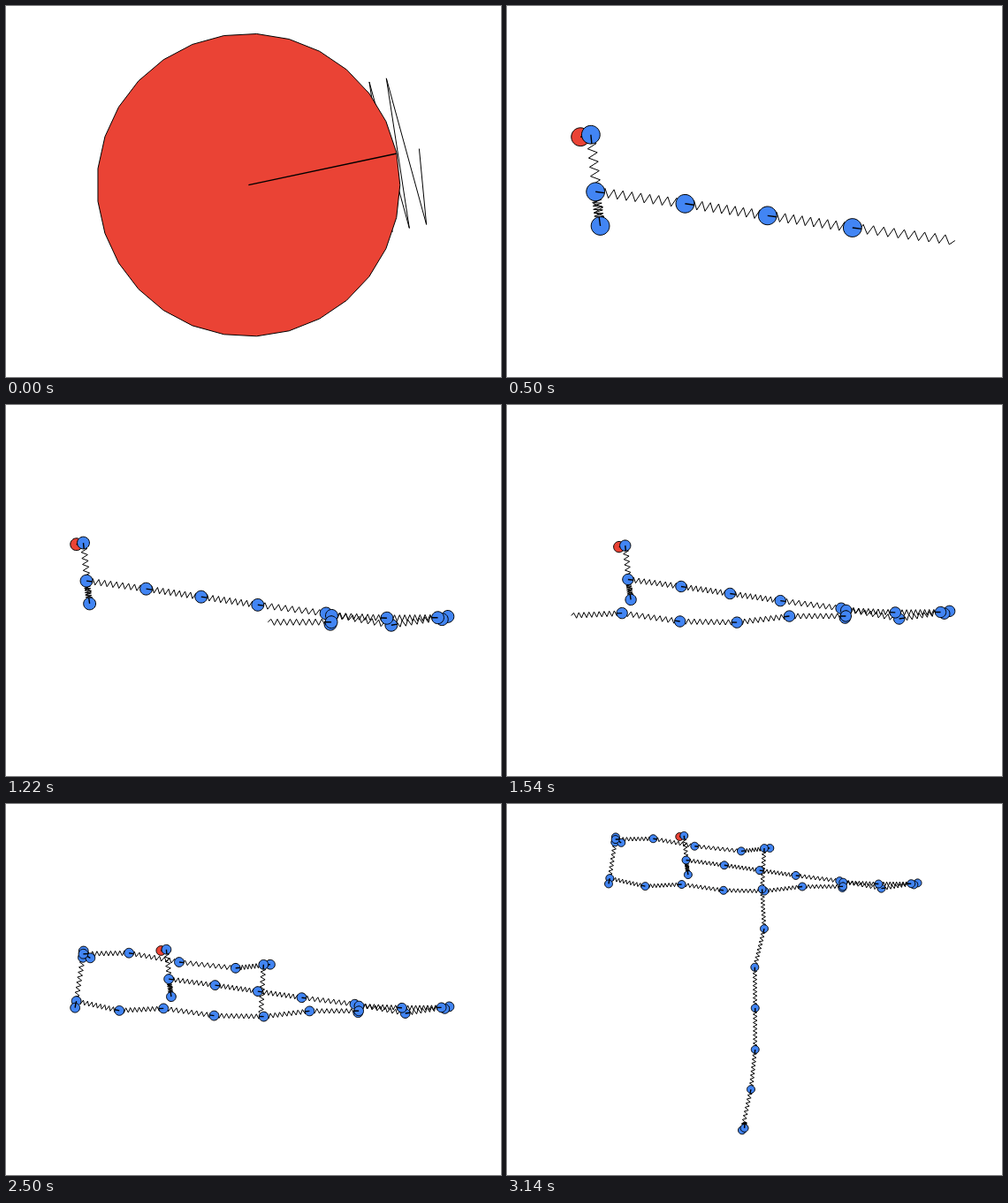
An HTML page with a canvas for the animation above (8000 ms loop, 560x420 px).

```html
<!DOCTYPE html>
<html lang="en">
<head>
<meta charset="utf-8">
<title>Spring chain</title>
<style>
  html, body { margin: 0; width: 100%; height: 100%; overflow: hidden; background: #fff; }
  canvas { display: block; }
</style>
</head>
<body>
<canvas id="stage" width="560" height="420"></canvas>
<script>
const ctx = document.getElementById('stage').getContext('2d');

const LOOP = 8000, FIRST = 100, STEP = 80, LAST = 39;
const RADIUS = 5.38, SIDES = 29, COILS = 20;
const VIEW = { cx: 289.8, cy: 202.65, w: 434, h: 342.3 };

// Joints of the chain in world units, in the order they are added.
const joints = [
  [175.4, 165.89], [181.46, 164.6], [187, 218.04], [184.2, 198.02], [236.6, 205],
  [284.9, 212], [334.6, 219.1], [394.6, 226.6], [451.8, 236.9], [501.5, 229.3],
  [496.4, 231.8], [492.7, 230.3], [448, 230.7], [399.5, 228.5], [398.4, 236.1],
  [399.2, 234.2], [343.5, 234.3], [291.7, 240.5], [235.5, 239.5], [178.3, 231.3],
  [128.3, 233.8], [79.7, 223], [78.2, 230.6], [87, 173.7], [87.8, 166.4],
  [95.4, 174.2], [87.5, 169.6], [139.2, 168.6], [196, 178.9], [259.8, 185.7],
  [299, 181.6], [291.4, 181.7], [288.4, 237.8], [291.3, 292], [278.4, 344.9],
  [278.9, 400.9], [278.9, 457.7], [273.1, 512.3], [261, 568.4], [264.2, 565.4],
  [264.8, 557.5]
];

function direction([x1, y1], [x2, y2]) {
  const dx = x2 - x1, dy = y2 - y1, length = Math.hypot(dx, dy);
  return [dx / length, dy / length];
}

function spring(a, b) {
  const [ux, uy] = direction(a, b);
  return Array.from({ length: COILS + 1 }, (_, i) => {
    const t = i / COILS;
    const side = i % COILS ? (i % 2 ? 1 : -1) * RADIUS / 2 : 0;
    return [a[0] + (b[0] - a[0]) * t - uy * side, a[1] + (b[1] - a[1]) * t + ux * side];
  });
}

function disc([x, y]) {
  return Array.from({ length: SIDES }, (_, i) => {
    const angle = i / SIDES * 2 * Math.PI;
    return [x + RADIUS * Math.cos(angle), y + RADIUS * Math.sin(angle)];
  });
}

function spoke(a, b) {
  const [ux, uy] = direction(a, b);
  return [a, [a[0] + ux * RADIUS, a[1] + uy * RADIUS]];
}

// Scales and centres the points in the view, like equal and tight plot axes.
function fit(points) {
  const xs = points.map(p => p[0]), ys = points.map(p => p[1]);
  const left = Math.min(...xs), right = Math.max(...xs);
  const top = Math.min(...ys), bottom = Math.max(...ys);
  const scale = Math.min(VIEW.w / (right - left), VIEW.h / (bottom - top));
  return ([x, y]) => [
    VIEW.cx + (x - (left + right) / 2) * scale,
    VIEW.cy + (y - (top + bottom) / 2) * scale
  ];
}

function trace(points, width, fill) {
  ctx.beginPath();
  points.forEach(p => ctx.lineTo(...p));
  if (fill) {
    ctx.closePath();
    ctx.fillStyle = fill;
    ctx.fill();
  }
  ctx.lineWidth = width;
  ctx.stroke();
}

function draw(step) {
  const nodes = joints.slice(0, step + 1);
  const springs = nodes.map((p, i) => spring(p, joints[i + 1]));
  const discs = nodes.map(disc);
  const project = fit([...springs, ...discs].flat());

  ctx.fillStyle = '#fff';
  ctx.fillRect(0, 0, 560, 420);
  ctx.strokeStyle = '#000';
  ctx.lineJoin = 'round';
  springs.forEach(points => trace(points.map(project), 1));
  nodes.forEach((p, i) => {
    trace(discs[i].map(project), 1, i ? '#4285f4' : '#ea4335');
    trace(spoke(p, joints[i + 1]).map(project), 1.4);
  });
}

let shown = -1;
function tick() {
  const time = performance.now() % LOOP;
  const step = Math.max(0, Math.min(LAST, Math.floor((time - FIRST) / STEP) + 1));
  if (step !== shown) draw(shown = step);
  requestAnimationFrame(tick);
}
tick();
</script>
</body>
</html>
```
